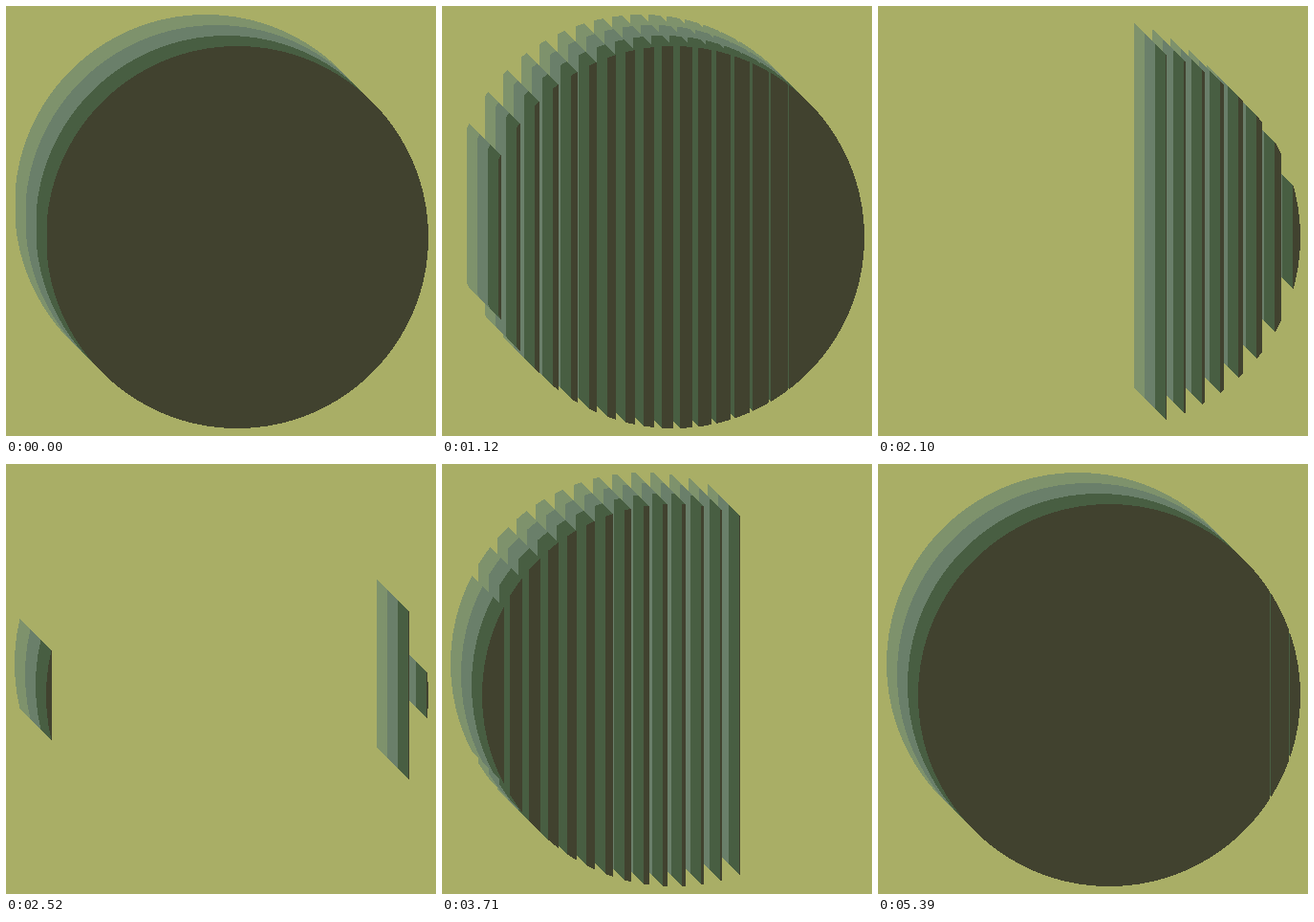
Write an HTML page with a canvas that moves like this. It is 450 px wide and 450 px high and loops after 5460 ms.

```html
<!DOCTYPE html>
<html lang="en">
<head>
<meta charset="utf-8">
<title>Sliced disc</title>
<style>
  html, body { margin: 0; width: 100%; height: 100%; overflow: hidden; background: #a9ae66; }
  canvas { display: block; }
</style>
</head>
<body>
<canvas id="stage" width="450" height="450"></canvas>
<script>
const ctx = document.getElementById('stage').getContext('2d');
const STEP = 70, STEPS = 78;
const R = 200, ORIGIN = 9, DEPTH = 33, BAND = 11;
const SLICE = 20, COUNT = 20, GROW_AT = 9;
const BACK = '#a9ae66';
const SHADES = ['#7e926c', '#6a7f6a', '#485e42', '#41422f'];

// Half height of the disc at each pixel column, for crisp edges
const half = Array.from({ length: 2 * R }, (_, c) =>
  Math.round(Math.sqrt(R * R - (c + 0.5 - R) ** 2)));

// Slices shrink toward their right edge, one after another
function shrinking(step) {
  const spans = [];
  for (let i = 0; i < COUNT; i++) {
    const w = Math.min(SLICE, 19 + i - step);
    if (w > 0) spans.push([(i + 1) * SLICE - w, (i + 1) * SLICE]);
  }
  return spans;
}

// Slices grow from their left edge, slowing a little at the end
function growing(step) {
  const spans = [];
  for (let k = 0; k < COUNT; k++) {
    const n = step - 39 - k;
    const w = Math.min(SLICE, n - (n > 15) - (n > 20));
    const x = GROW_AT + k * SLICE;
    const from = k ? x : 0;
    const to = Math.min(2 * R, x + w);
    if (to > from) spans.push([from, to]);
  }
  return spans;
}

function draw(step) {
  const spans = shrinking(step).concat(growing(step));
  ctx.fillStyle = BACK;
  ctx.fillRect(0, 0, 450, 450);
  for (let d = 0; d <= DEPTH; d++) {
    const left = ORIGIN + d, mid = left + R;
    ctx.fillStyle = SHADES[Math.floor(d / BAND)];
    for (const [from, to] of spans) {
      for (let c = from; c < to; c++) {
        ctx.fillRect(left + c, mid - half[c], 1, 2 * half[c]);
      }
    }
  }
}

const start = performance.now();
let shown = -1;

function tick() {
  const step = Math.floor((performance.now() - start) / STEP) % STEPS;
  if (step !== shown) draw(shown = step);
  requestAnimationFrame(tick);
}
tick();
</script>
</body>
</html>
```
